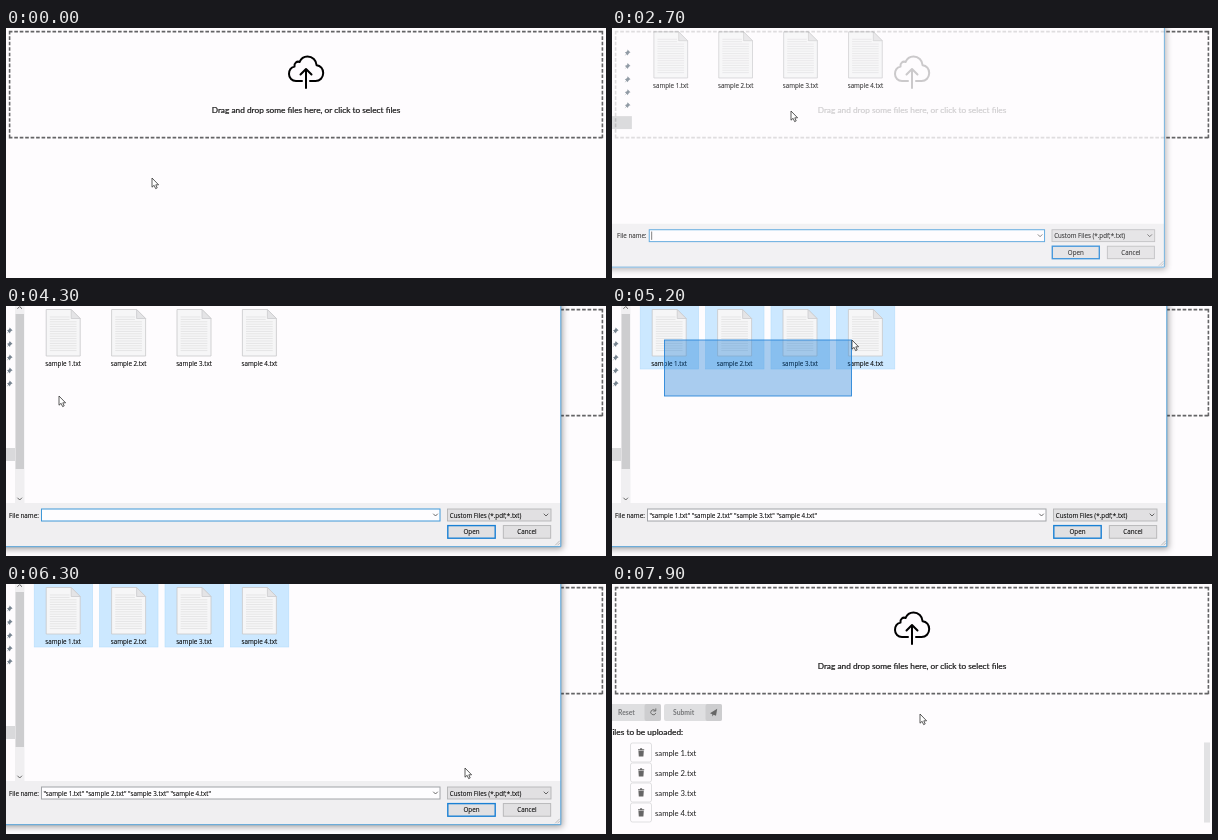
Write an HTML page that moves like this. It is 600 by 250 pixels and loops after 8 s.

```html
<!DOCTYPE html>
<html lang="en">
<head>
<meta charset="utf-8">
<title>File upload</title>
<style>
  html, body { margin: 0; width: 100%; height: 100%; overflow: hidden; background: #fefcfe; }
  svg { display: block; width: 100%; height: 100%; }
  .page { font-family: Lato, sans-serif; font-size: 8.3px; fill: #1c1c1c; }
  .strong { stroke: #1c1c1c; stroke-width: .22; }
  .dialog { font-family: "Open Sans", "Noto Sans", sans-serif; font-size: 6.25px; fill: #000; }
  .dialog text { stroke: #000; stroke-width: .08; }
  .button { font-weight: 700; font-size: 6.8px; fill: #77787a; }
  .item { font-size: 7.7px; }
  .mid { text-anchor: middle; }
  .line { fill: none; stroke-linecap: round; stroke-linejoin: round; }
</style>
</head>
<body>
<svg id="stage" viewBox="0 0 600 250"></svg>
<script>
const DURATION = 8000, STEP = 100;
const DRAG_START = 4350, DRAG_END = 5700, CLICK = 7100, LISTED = 7500;
const ORIGIN = { x: 53, y: 90 };
const files = [1, 2, 3, 4].map((n, i) => ({ name: `sample ${n}.txt`, x: 57.2 + i * 65.4 }));

const rect = (x, y, w, h, fill, extra = '') =>
  `<rect x="${x}" y="${y}" width="${w}" height="${h}" fill="${fill}" ${extra}/>`;
const text = (x, y, s, extra = '') => `<text x="${x}" y="${y}" ${extra}>${s}</text>`;
const line = (d, color, width, extra = '') =>
  `<path class="line" d="${d}" stroke="${color}" stroke-width="${width}" ${extra}/>`;
const chevron = (x, y, dir = 1) =>
  line(`M${x - 2} ${y - dir}l2 ${2 * dir}l2 ${-2 * dir}`, '#444', 0.8);

const dropZone = () =>
  '<path d="M2.8 3.6H597.2M2.8 109.6H597.2M3.6 2.8V110.4M596.4 2.8V110.4" ' +
    'stroke="#646466" stroke-width="1.6" stroke-dasharray="3.64 1.82"/>' +
  line('M296 53H290C286 53 283 50 283 46C283 42 285.5 39.3 288.5 38.6C288 35 291 32.8 293.6 34' +
    'C295 30.5 298 28.5 301.5 28.5C306.5 28.5 310.3 32.2 310.6 37.2C314.5 37.5 317.2 41 317.2 45' +
    'C317.2 49.5 314 53 309.5 53H304M300 60V41M294.5 46.5L300 41L305.5 46.5', '#000', 2) +
  text(300, 84.5, 'Drag and drop some files here, or click to select files', 'class="mid strong"');

const actionButton = (x, right, label, labelX, icon) =>
  rect(x, 120, right - x, 17, '#dfdfe1', 'rx="2"') +
  rect(right - 16.5, 120, 16.5, 17, '#cdcdcf', 'rx="2"') +
  text(labelX, 131, label, 'class="button"') + icon;

const trashRow = ({ name }, i) => `<g transform="translate(0 ${i * 20})">` +
  rect(18.5, 159, 21, 19, '#fefcfe', 'rx="2" stroke="#dcdcde" stroke-width=".9"') +
  '<path d="M26 165.2h1.8l.5-.9h1.6l.5.9h1.8v1h-6.2zM26.4 166.8h5.4l-.4 5.6h-4.6z" fill="#666"/>' +
  text(43, 171.5, name, 'class="item"') + '</g>';

const uploadList = () =>
  actionButton(-4, 49, 'Reset', 6,
    line('M43.2 126.4a2.6 2.6 0 1 0 .5 3M43.8 124.8v2.2h-2.2', '#666', 0.9)) +
  actionButton(52, 110, 'Submit', 61,
    '<path d="M98 129.2l7.2-4.4l-1.2 7l-2.4-1l-1.3 1.6v-2.2z" fill="#666"/>') +
  text(-4.3, 151, 'Files to be uploaded:', 'class="strong"') +
  files.map(trashRow).join('') +
  rect(592, 158.5, 6, 80, '#e2e2e4');

function fileItem({ name, x }, i) {
  let rules = '';
  for (let y = 11; y < 46; y += 2.4) rules += `M${x - 13} ${y}H${x + (y < 14 ? 6 : 13)}`;
  return rect(x - 29, -4, 58.4, 67, '#cce8ff', `id="mark${i}" stroke="#b5dcfb" stroke-width=".6"`) +
    `<path d="M${x - 17} 3.5h25l9 9v37.5h-34z" fill="#f6f6f7" stroke="#c8c8ca" stroke-width=".8"/>` +
    `<path d="M${x + 8} 3.5v9h9z" fill="#e4e4e6" stroke="#c8c8ca" stroke-width=".7"/>` +
    line(rules, '#dededf', 0.7) +
    text(x, 60, name, 'class="mid"');
}

const pins = x => [24, 37.5, 51, 64, 77].map(y =>
  `<path d="M${x - .4} ${y - 2.6}l3 3l-1 .3l-1.3 1.4l-.3 1.3l-1.4-1.4l-2 1.8l1.7-2.2l-1.4-1.4l1.4-.3l1.2-1.3z" fill="#76838f"/>`).join('');

const pushButton = (x, label, border, width) =>
  rect(x, 219.6, 47.4, 12.6, '#e1e0e2', `stroke="${border}" stroke-width="${width}"`) +
  text(x + 23.7, 228.2, label, 'class="mid"');

const dialog = () =>
  rect(-30, -30, 585, 271, '#fefcfe', 'filter="url(#shadow)"') +
  `<g id="navOpening">${rect(-30, 88.5, 48, 13, '#d3d3d5')}${pins(14)}</g>` +
  `<g id="navReady">${rect(-30, 142, 39, 13, '#d9d9db')}${pins(4)}` +
    rect(9, -5, 9.5, 202, '#f0eff1') + rect(9.6, 8, 8.4, 155, '#cdcdcf') +
    chevron(13.7, 1.5, -1) + chevron(13.7, 193) + '</g>' +
  files.map(fileItem).join('') +
  rect(-30, 197, 585, 44, '#f0eff1') +
  text(3, 211.5, 'File name:') +
  rect(35.5, 203, 398.5, 12, '#fefdff', 'id="field" stroke-width="1"') +
  text(37.5, 211.5, '', 'id="value"') +
  rect(37.7, 204.8, .7, 8.4, '#222', 'id="caret"') +
  chevron(429.5, 209) +
  rect(441.5, 203, 103.5, 12, '#e1e0e2', 'stroke="#b4b4b6" stroke-width=".9"') +
  text(443.7, 211.5, 'Custom Files (*.pdf;*.txt)') +
  chevron(540, 209) +
  pushButton(441.8, 'Open', '#1a80d4', 1.4) +
  pushButton(497.3, 'Cancel', '#b4b4b6', .9) +
  line('M549.5 239l4-4M551.8 239l1.7-1.7', '#b0b0b2', .8) +
  line('M-5 240.7H554.8V-5', '#4f9dd4', 1) +
  rect(0, 0, 0, 0, '#0a72d2', 'id="band" fill-opacity=".35" stroke="#2a86d8" stroke-width=".9"');

document.getElementById('stage').innerHTML = `
  <defs><filter id="shadow" x="-10%" y="-20%" width="120%" height="140%">
    <feDropShadow dx="1.5" dy="2" stdDeviation="3" flood-color="#000" flood-opacity=".36"/>
  </filter></defs>
  <g class="page">${dropZone()}<g id="list">${uploadList()}</g></g>
  <g class="dialog" id="dialog">${dialog()}</g>
  <g id="cursor">
    <path d="M0 0V9.2L2.1 7.3L3.6 10.6L5.2 9.9L3.8 6.8H6.6Z" fill="#fff" stroke="#333" stroke-width=".8"/>
    <g id="busy"><circle cx="7.2" cy=".8" r="3.2" fill="#fff" stroke="#2b8fe0" stroke-width="2"/>
      <path class="line" id="glint" d="M7.2 -2.4a3.2 3.2 0 0 1 3.2 3.2" stroke="#74bdf2" stroke-width="1.5"/></g>
  </g>`;

const el = id => document.getElementById(id);
const set = (id, attrs) => Object.entries(attrs).forEach(([k, v]) => el(id).setAttribute(k, v));
const show = (id, on) => set(id, { visibility: on ? 'inherit' : 'hidden' });
const clamp = v => Math.max(0, Math.min(1, v));
const smooth = v => v * v * (3 - 2 * v);

// time, x, y
const path = [
  [0, 146, 150], [200, 141, 149], [800, 179, 83], [3600, 179, 83], [4200, 53, 90],
  [DRAG_START, 53, 90], [4950, 240, 34], [DRAG_END, 240, 34], [6300, 459, 184],
  [6400, 459, 184], [6900, 466, 225], [7300, 466, 225], [7800, 308, 130], [DURATION, 308, 130]
];

function cursorAt(t) {
  const i = path.findIndex(p => p[0] > t);
  const [t0, x0, y0] = path[i - 1], [t1, x1, y1] = path[i];
  const k = smooth((t - t0) / (t1 - t0));
  return { x: x0 + (x1 - x0) * k, y: y0 + (y1 - y0) * k };
}

function drawDialog(t, cursor) {
  const opening = clamp((t - 2500) / 250), closing = clamp((t - 7200) / 250);
  const opacity = opening * (1 - closing);
  const scale = 1 - .04 * (1 - opacity);
  set('dialog', { opacity, transform: `translate(253 45) scale(${scale}) translate(-253 -45)` });
  show('dialog', opacity > 0);
  show('navOpening', t < 2900);
  show('navReady', t >= 2900);

  const dragging = t >= DRAG_START && t < DRAG_END;
  show('band', dragging);
  if (dragging) set('band', {
    x: ORIGIN.x - .5, y: cursor.y,
    width: Math.max(0, cursor.x - ORIGIN.x), height: Math.max(0, ORIGIN.y - cursor.y)
  });

  const touched = ({ x }) => t >= DRAG_END || dragging && cursor.x > x - 17 && cursor.y < 63;
  const picked = files.filter(touched);
  files.forEach((file, i) => {
    show('mark' + i, picked.includes(file));
    set('mark' + i, { fill: t < CLICK ? '#cce8ff' : '#d9d9db', stroke: t < CLICK ? '#b5dcfb' : '#d9d9db' });
  });
  el('value').textContent = picked.length > 1
    ? picked.map(f => `"${f.name}"`).join(' ') : picked.map(f => f.name).join('');

  const focused = t < DRAG_START;
  set('field', { stroke: focused ? '#3f98d8' : '#a2a4a8' });
  show('caret', focused && (t - 2600) % 1060 < 530);
}

function draw(t) {
  const cursor = cursorAt(t);
  show('list', t >= LISTED);
  drawDialog(t, cursor);
  set('cursor', { transform: `translate(${cursor.x} ${cursor.y})` });
  show('busy', t >= 900 && t < 2600);
  set('glint', { transform: `rotate(${t * .36} 7.2 .8)` });
}

const start = performance.now();
function tick() {
  const t = (performance.now() - start) % DURATION;
  draw(Math.floor(t / STEP) * STEP);
  requestAnimationFrame(tick);
}
tick();
</script>
</body>
</html>
```
